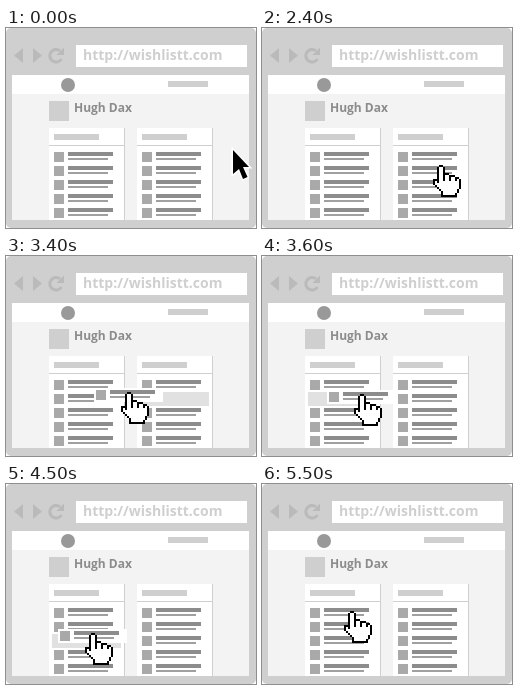
Recreate the animation shown at these times as an HTML page. Size 250 by 200 pixels, loop 6 s.

```html
<!DOCTYPE html>
<html lang="en">
<head>
<meta charset="utf-8">
<title>Drag between lists</title>
<style>
html, body { margin: 0; width: 100%; height: 100%; overflow: hidden; background: #fff; }
svg { display: block; width: 250px; height: 200px; }
text { font-family: "Open Sans", "Noto Sans", sans-serif; font-weight: 700; }
</style>
</head>
<body>
<svg viewBox="0 0 250 200">
  <defs>
    <g id="row">
      <rect width="10" height="10" fill="#a9a9a9"/>
      <rect x="14" width="45" height="4" fill="#8c8c8c"/>
      <rect x="14" y="6" width="40" height="2" fill="#a0a0a0"/>
    </g>
    <g id="list">
      <rect width="75" height="92" fill="#fff"/>
      <rect x="75" width="1" height="92" fill="#cfcfcf"/>
      <rect x="5" y="6" width="45" height="6" fill="#cfcfcf"/>
      <rect y="17" width="75" height="1" fill="#cfcfcf"/>
      <use href="#row" x="5" y="24"/>
      <use href="#row" x="5" y="38"/>
      <use href="#row" x="5" y="52"/>
      <use href="#row" x="5" y="66"/>
      <use href="#row" x="5" y="80"/>
    </g>
  </defs>

  <rect width="250" height="200" rx="5" fill="#cfcfcf"/>
  <g fill="#bababa">
    <path d="M8 27.5L17 20V35ZM36 27.5L27 20V35Z"/>
    <path d="M55.5 31A6.3 6.3 0 1 1 54 22.800" fill="none" stroke="#bababa" stroke-width="3"/>
    <path d="M58 19.500V27H50.500Z"/>
  </g>
  <rect x="70" y="17" width="171" height="22" fill="#fff"/>
  <text x="77" y="32" font-size="14" fill="#cfcfcf">http://wishlistt.com</text>

  <rect x="6" y="47" width="237" height="145" fill="#f3f3f3"/>
  <rect x="6" y="47" width="237" height="19" fill="#fff"/>
  <circle cx="62" cy="57" r="7" fill="#999"/>
  <rect x="162" y="53" width="40" height="6" fill="#cfcfcf"/>
  <rect x="43" y="73" width="20" height="20" fill="#cfcfcf"/>
  <text x="68" y="84" font-size="12" fill="#8c8c8c">Hugh Dax</text>

  <use href="#list" x="43" y="100"/>
  <use href="#list" x="131" y="100"/>

  <rect id="slot" width="69" height="14" fill="#e1e1e1"/>
  <g id="item">
    <rect x="-2" y="-2" width="69" height="14" fill="#fff"/>
    <use href="#row"/>
  </g>
  <path id="arrow" d="M0 0L16 17H10L14.500 27L10 29L6 19L0 24Z" fill="#000"
    stroke="#fff" stroke-width="3" paint-order="stroke"/>
  <g id="hand" shape-rendering="crispEdges">
    <g transform="translate(-8 0) scale(2)">
      <path d="M3 0H5V1H6V4H8V5H11V6H13V7H14V12H13V14H12V16H4V13H3V12H2V11H1V10H0V7H2V1H3Z"/>
      <path fill="#fff" d="M3 1H5V5H8V6H11V7H13V12H12V14H11V15H5V13H4V12H3V11H2V10H1V8H2V9H3Z"/>
      <path d="M5 5h1v3h-1zM8 6h1v2h-1zM11 7h1v1h-1z"/>
    </g>
  </g>
</svg>
<script>
const LOOP = 6000, STEP = 100, LIFT = 3100, DROP = 5500;

// time, pointer x, pointer y
const path = [
  [0, 227, 122], [1900, 227, 122], [2500, 169, 140], [3000, 169, 140],
  [3100, 158, 139], [3400, 123, 136], [3600, 100, 138], [3700, 91, 144],
  [4000, 86, 153], [4400, 86, 153], [4800, 89, 135], [5000, 90, 127],
  [LOOP, 90, 127]
];

const [slot, item, arrow, hand] =
  ["slot", "item", "arrow", "hand"].map(id => document.getElementById(id));

function pointerAt(t) {
  const i = path.findIndex(p => p[0] > t);
  const a = path[i - 1], b = path[i];
  const k = (t - a[0]) / (b[0] - a[0]);
  return [1, 2].map(n => Math.round(a[n] + (b[n] - a[n]) * k));
}

function place(el, x, y) {
  el.setAttribute("transform", `translate(${x} ${y})`);
}

function show(el, on) {
  el.setAttribute("visibility", on ? "visible" : "hidden");
}

function draw(time) {
  const t = Math.floor(time % LOOP / STEP) * STEP;
  const [x, y] = pointerAt(t);
  const over = x < 203;
  const held = t >= LIFT && t < DROP;
  const left = x - 33, top = y - 2;
  const row = Math.round((top - 124) / 14);

  show(arrow, !over);
  show(hand, over);
  show(item, held);
  show(slot, held);
  place(arrow, x, y);
  place(hand, x, y);
  place(item, left, top);
  place(slot, x < 119 ? 46 : 134, 122 + 14 * row);
}

const start = performance.now();
function tick() {
  draw(performance.now() - start);
  requestAnimationFrame(tick);
}
tick();
</script>
</body>
</html>
```
